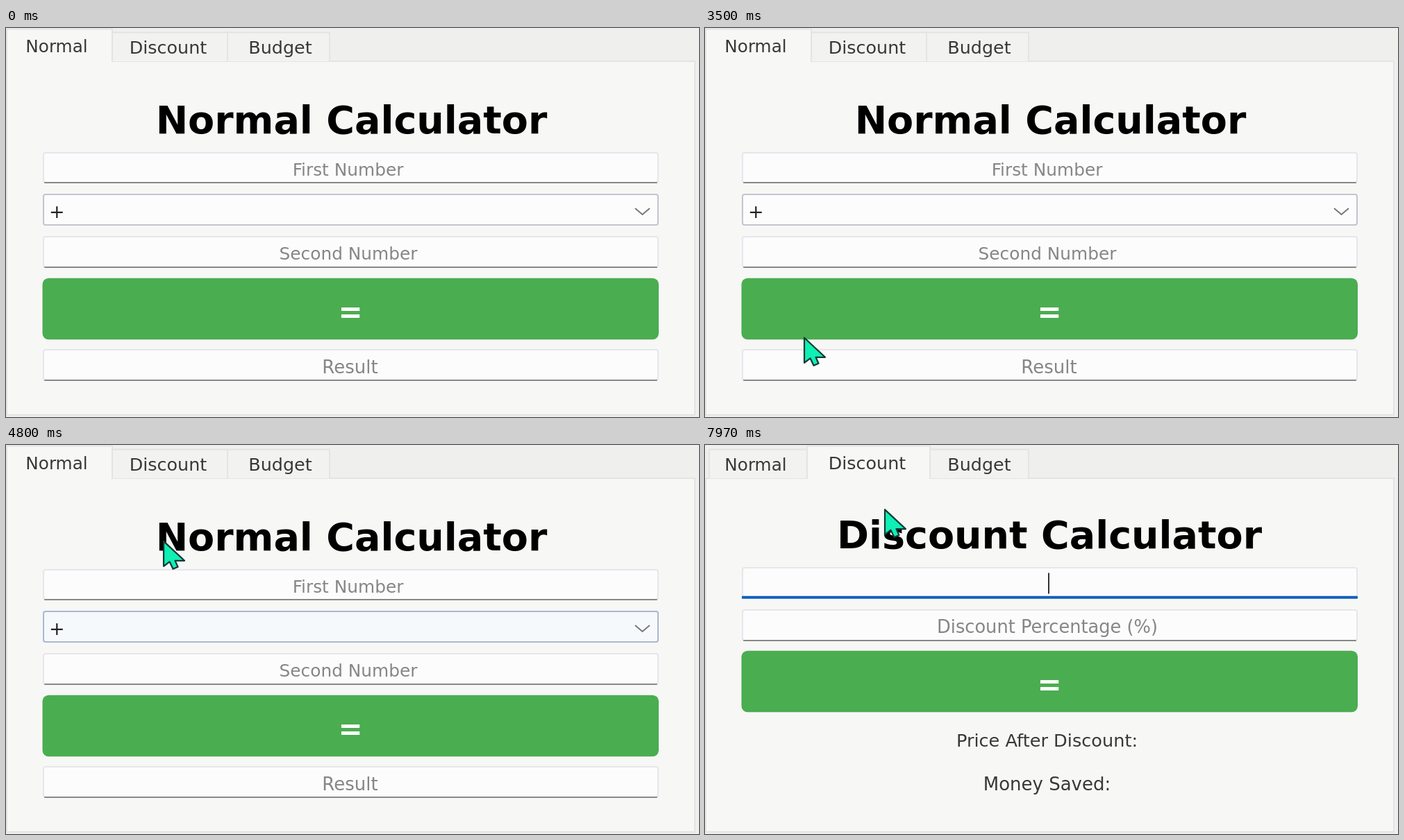
These frames come from a looping animation (998x561 px, 8000 ms). An HTML page:

```html
<!DOCTYPE html>
<html lang="en">
<head>
<meta charset="utf-8">
<title>Calculator</title>
<style>
html, body { margin: 0; width: 100%; height: 100%; overflow: hidden; background: #efefee; }
svg { display: block; width: 100vw; height: 100vh; }
text { font-family: "DejaVu Sans", sans-serif; font-size: 25.3px; fill: #383838; text-anchor: middle; }
.title { font-weight: bold; font-size: 55.5px; fill: #000; }
.equals { font-weight: bold; font-size: 42px; fill: #fff; }
.hint { fill: #868686; }
.choice { font-size: 27px; fill: #222; text-anchor: start; }
</style>
</head>
<body>
<svg id="stage" viewBox="0 0 998 561" preserveAspectRatio="none"></svg>
<script>
const LOOP = 8000, SWITCH = 6400, BLINK = 530;
const PAGE = '#f7f7f6', EDGE = '#e4e4e5';
const stage = document.getElementById('stage');

function add(parent, tag, attrs, content) {
  const el = document.createElementNS('http://www.w3.org/2000/svg', tag);
  for (const key in attrs) el.setAttribute(key, attrs[key]);
  if (content) el.textContent = content;
  return parent.appendChild(el);
}
const rect = (p, x, y, width, height, fill, more) =>
  add(p, 'rect', { x, y, width, height, fill, ...more });
const label = (p, x, y, str, cls = '', size) =>
  add(p, 'text', { x, y, class: cls, ...(size && { style: `font-size:${size}px` }) }, str);
const show = (el, on) => el.setAttribute('visibility', on ? 'visible' : 'hidden');

function tab(p, x, right, name, center, active) {
  const top = active ? 1.5 : 6.5;
  const box = add(p, 'path', {
    d: `M${x} 48V${top}H${right}V48`, fill: active ? PAGE : '#f2f2f1',
    stroke: EDGE, 'stroke-width': 2
  });
  if (active) rect(p, x + 1, 46, right - x - 2, 5, PAGE);
  label(p, center, active ? 35 : 37, name, '', name === 'Normal' ? 24.7 : 25.4);
  return box;
}

function field(p, y, h, hint, center, base, size) {
  rect(p, 54, y, 885, h, '#fcfcfc', { rx: 3, stroke: '#e6e6ec', 'stroke-width': 2 });
  rect(p, 55, y + h - 1, 883, 2, '#888', { rx: 1 });
  if (hint) label(p, center, base, hint, 'hint', size);
}

function button(p, y) {
  rect(p, 52.5, y - 0.3, 887.5, 88.6, '#4aad50', { rx: 9 });
  label(p, 496, y + 63, '=', 'equals');
}

// Shared panel
rect(stage, 0, 0, 998, 561, '#efefee');
rect(stage, 1, 48, 991, 510, PAGE, { stroke: EDGE, 'stroke-width': 2 });

// Normal page
const normal = add(stage, 'g', {});
const discountTab = tab(normal, 153, 319, 'Discount', 233.5);
tab(normal, 319, 466, 'Budget', 395);
tab(normal, 1, 153, 'Normal', 73, true);
label(normal, 497.5, 151.5, 'Normal Calculator', 'title');
field(normal, 180, 43, 'First Number', 492.5, 212.5, 24.8);
const combo = rect(normal, 54, 240, 885, 44, '#fcfcfc', { rx: 3, 'stroke-width': 2 });
label(normal, 62, 274, '+', 'choice');
add(normal, 'path', { d: 'M906 260l10.5 9 10.5-9', fill: 'none', stroke: '#777', 'stroke-width': 2 });
field(normal, 301, 44, 'Second Number', 493, 334, 24.8);
button(normal, 361);
field(normal, 464, 44, 'Result', 495.5, 498, 26);

// Discount page
const discount = add(stage, 'g', {});
tab(discount, 6, 147, 'Normal', 73);
tab(discount, 324, 466, 'Budget', 395);
tab(discount, 147, 324, 'Discount', 233.5, true);
label(discount, 496, 149, 'Discount Calculator', 'title');
field(discount, 177, 42);
rect(discount, 53, 217.7, 887, 4, '#1060c0', { rx: 1 });
const caret = rect(discount, 494, 184.5, 2, 30, '#333');
field(discount, 238, 44, 'Discount Percentage (%)', 493, 271, 25.7);
button(discount, 297);
label(discount, 492.5, 434.5, 'Price After Discount:', '', 25.6);
label(discount, 492.5, 498, 'Money Saved:', '', 26);

const pointer = add(stage, 'path', {
  d: 'M0 1V37L8.5 30.5L13.5 41L20.5 38L16.5 29H30Z',
  fill: '#10efb4', stroke: '#123a35', 'stroke-width': 2.2, 'stroke-linejoin': 'round'
});

// Pointer tip: time, x, y
const path = [
  [2970, 121, 552], [3500, 143, 446], [3930, 163, 351], [4300, 192, 244],
  [4800, 227, 138], [5200, 241, 81], [5470, 246, 50], [5630, 247, 39],
  [6200, 247, 39], [6390, 248, 40], [7400, 248, 40], [7700, 253, 62],
  [7970, 259, 92], [8000, 259.5, 95]
];
const slope = (i, k) => (path[i + 1][k] - path[i][k]) / (path[i + 1][0] - path[i][0]);

// Monotone tangent: harmonic mean of both neighbouring slopes
function tangent(i, k) {
  if (i === 0) return slope(0, k);
  if (i === path.length - 1) return slope(i - 1, k);
  const a = slope(i - 1, k), b = slope(i, k);
  return a * b > 0 ? 2 * a * b / (a + b) : 0;
}

function along(t, k) {
  let i = 0;
  while (i < path.length - 2 && t >= path[i + 1][0]) i++;
  const d = path[i + 1][0] - path[i][0], u = (t - path[i][0]) / d, v = 1 - u;
  return v * v * (1 + 2 * u) * path[i][k] + u * u * (3 - 2 * u) * path[i + 1][k]
    + u * v * d * (v * tangent(i, k) - u * tangent(i + 1, k));
}

const ramp = (t, from, to) => Math.min(1, Math.max(0, (t - from) / (to - from)));
const mix = (a, b, u) => `rgb(${a.map((c, i) => Math.round(c + (b[i] - c) * u))})`;

function draw(t) {
  const switched = t >= SWITCH;
  show(normal, !switched);
  show(discount, switched);
  const blinkOn = Math.floor((t - SWITCH) / BLINK) % 2 === 0 || t >= SWITCH + 2 * BLINK;
  show(caret, switched && blinkOn);

  const hover = ramp(t, 4150, 4270) * (1 - ramp(t, 4330, 5000));
  combo.setAttribute('fill', mix([252, 252, 252], [232, 241, 249], hover));
  combo.setAttribute('stroke', mix([196, 196, 208], [110, 155, 214], hover));
  discountTab.setAttribute('fill', mix([242, 242, 241], [224, 238, 250], ramp(t, 5480, 5630)));

  show(pointer, t >= path[0][0]);
  if (t >= path[0][0])
    pointer.setAttribute('transform', `translate(${along(t, 1).toFixed(2)} ${along(t, 2).toFixed(2)})`);
}

const start = performance.now();
function tick() {
  draw((performance.now() - start) % LOOP);
  requestAnimationFrame(tick);
}
tick();
</script>
</body>
</html>
```
